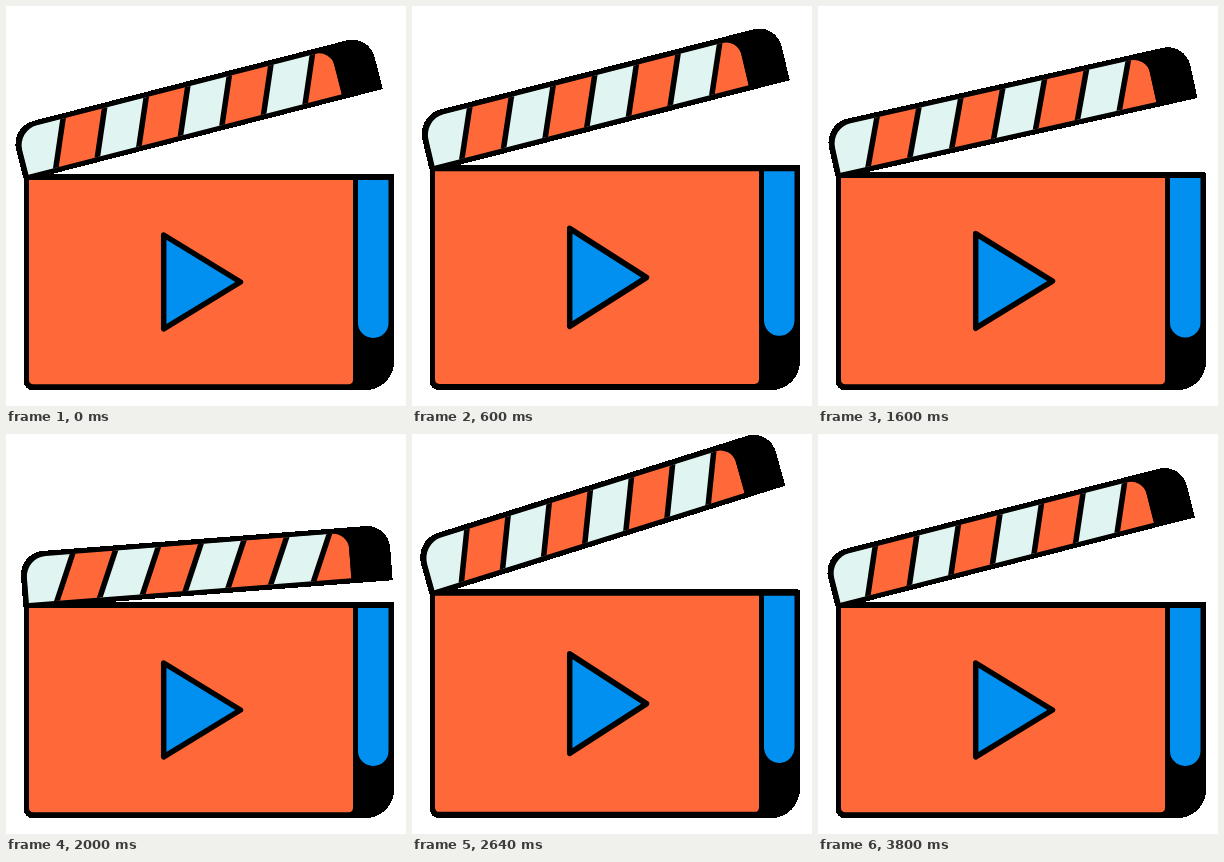
These frames come from a looping animation (400 px wide and 400 px high, 3.84 s). An HTML page:

```html
<!DOCTYPE html>
<html lang="en">
<head>
<meta charset="utf-8">
<title>Clapperboard</title>
<style>
  html, body { margin: 0; width: 100%; height: 100%; overflow: hidden; background: #fff; }
  svg { display: block; width: 100%; height: 100%; }
  .edge { shape-rendering: crispEdges; }
  .ink { stroke: #000; stroke-width: 5.5; stroke-linejoin: round; }
</style>
</head>
<body>
<svg viewBox="0 0 400 400">
  <defs>
    <clipPath id="stick">
      <path d="M2.5 -1.7V-27A20.5 20.5 0 0 1 23 -47.5H310A16 16 0 0 1 326 -31.5V-1.7Z"/>
    </clipPath>
  </defs>
  <g id="board">
    <path class="edge" d="M20 168H386Q388 168 388 170V356A28 28 0 0 1 360 384H26A8 8 0 0 1 18 376V170Q18 168 20 168Z"/>
    <path d="M352 174H382.5V317A15 15 0 0 1 367.5 332H367A15 15 0 0 1 352 317Z" fill="#0290f0"/>
    <path d="M23 174H347V373.500Q347 378.200 342.500 378.200H27.500Q23 378.200 23 373.500Z" fill="#ff6838"/>
    <path class="ink" d="M157.700 229L234.500 276L157.700 322.800Z" fill="#0290f0"/>
    <g id="arm">
      <path class="edge" d="M-3.300 0V-28.500A24 24 0 0 1 20.700 -52.700H344A23 23 0 0 1 367 -29.700V3.400H-0.500Q-3.300 3.400 -3.300 0Z"/>
      <g id="stripes" clip-path="url(#stick)"></g>
    </g>
  </g>
</svg>
<script>
  const LOOP = 1920, STEP = 40;
  const PIVOT_X = 20.5, PIVOT_Y = 171, FLOOR = 384;
  const board = document.getElementById('board');
  const arm = document.getElementById('arm');
  const stripes = document.getElementById('stripes');

  function add(parent, attrs) {
    const el = document.createElementNS('http://www.w3.org/2000/svg', 'path');
    for (const key in attrs) el.setAttribute(key, attrs[key]);
    parent.appendChild(el);
  }

  const GAP = 42.9, FIRST = 30, SLANT = 21;
  const edge = k => FIRST + GAP * k;
  for (let k = 0; k < 8; k++) {
    const left = k ? edge(k - 1) : -40;
    const right = k < 7 ? edge(k) : 340;
    add(stripes, {
      d: `M${left} 0L${left + SLANT} -50H${right + SLANT}L${right} 0Z`,
      fill: k % 2 ? '#ff6838' : '#e0f5f1'
    });
  }
  for (let k = 0; k < 7; k++) {
    add(stripes, { d: `M${edge(k)} 0l${SLANT} -50`, class: 'ink' });
  }

  // Smooth curve through [time, value] keys that never overshoots them.
  function curve(keys) {
    const secant = i => (keys[i + 1][1] - keys[i][1]) / (keys[i + 1][0] - keys[i][0]);
    const slopes = keys.map((_, i) => {
      if (i === 0 || i === keys.length - 1) return 0;
      const a = secant(i - 1), b = secant(i);
      return a * b > 0 ? 2 * a * b / (a + b) : 0;
    });
    return t => {
      let i = 0;
      while (i < keys.length - 2 && t >= keys[i + 1][0]) i++;
      const [t0, v0] = keys[i], [t1, v1] = keys[i + 1];
      const h = t1 - t0, u = (t - t0) / h, w = 1 - u;
      return v0 * w * w * (1 + 2 * u) + v1 * u * u * (3 - 2 * u)
        + h * u * w * (slopes[i] * w - slopes[i + 1] * u);
    };
  }

  const angle = curve([
    [0, 14.4], [40, 10.6], [80, 4.4], [120, 0], [320, 0], [400, 4.3], [600, 13.8],
    [740, 16.6], [880, 15.5], [1160, 12.2], [1320, 11.3], [1680, 13], [LOOP, 14.4]
  ]);
  const stretch = curve([
    [0, 1], [80, 1], [240, 0.87], [400, 0.922], [600, 1.042],
    [720, 1.058], [1160, 1.034], [LOOP, 1]
  ]);

  function draw(ms) {
    const t = Math.floor(ms / STEP) * STEP % LOOP;
    board.setAttribute('transform',
      `translate(0 ${FLOOR}) scale(1 ${stretch(t)}) translate(0 ${-FLOOR})`);
    arm.setAttribute('transform', `translate(${PIVOT_X} ${PIVOT_Y}) rotate(${-angle(t)})`);
  }

  const start = performance.now();
  function tick() {
    draw(performance.now() - start);
    requestAnimationFrame(tick);
  }
  draw(0);
  requestAnimationFrame(tick);
</script>
</body>
</html>
```
